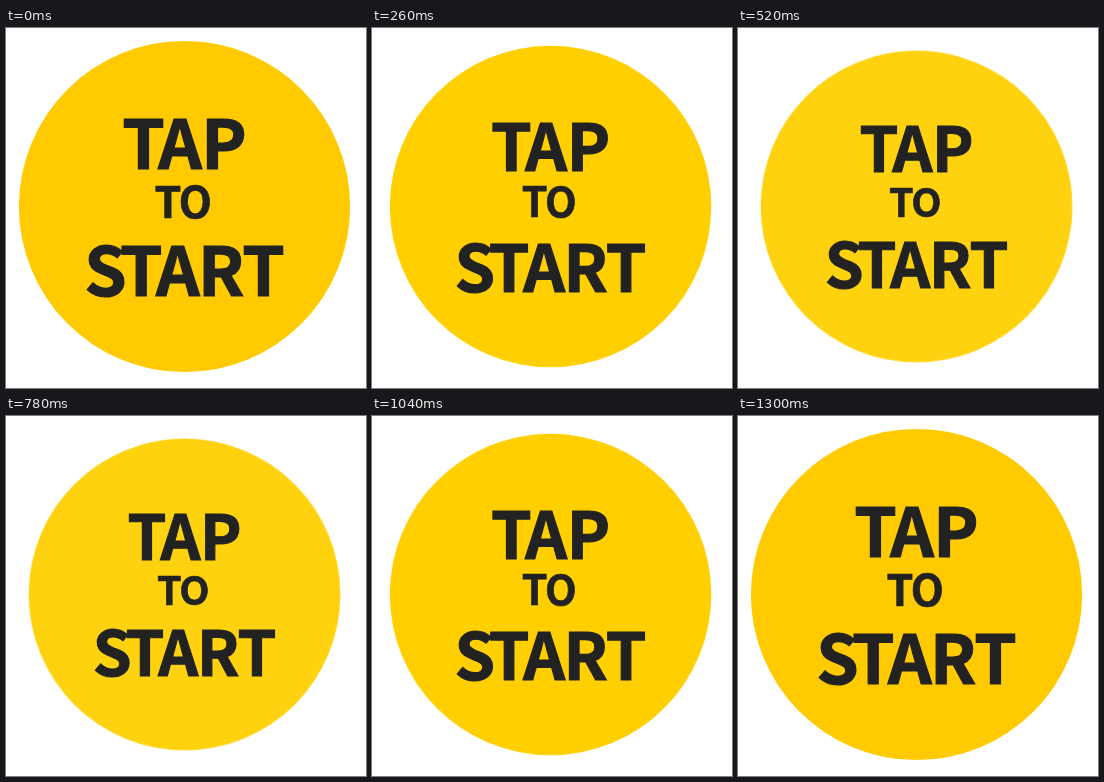
An HTML page for the animation above (1430 ms loop, 360 by 360 pixels).

```html
<!DOCTYPE html>
<html lang="en">
<head>
<meta charset="utf-8">
<title>Tap to start</title>
<style>
  html, body {
    margin: 0;
    width: 100%;
    height: 100%;
    overflow: hidden;
    background: #fff;
  }
  svg { display: block; width: 100vw; height: 100vh; }

  .disc, .label { animation: 1430ms infinite; }
  .disc {
    --small: 0.9265;
    transform-origin: 178.5px 178.5px;
    fill: #ffcb00;
    animation-name: shrink, tint;
  }
  .label {
    --small: 0.895;
    transform-origin: 179px 179.5px;
    fill: #222;
    stroke: #222;
    stroke-width: 1.2;
    font: 700 68px "Noto Sans CJK JP", "Noto Sans CJK SC", "Open Sans", sans-serif;
    text-anchor: middle;
    animation-name: shrink;
  }
  .minor { font-size: 43px; stroke-width: 0.7; }

  /* Five steps in, five steps out, then one slot of rest */
  @keyframes shrink {
    0% { transform: scale(1); animation-timing-function: steps(5); }
    45.4545% { transform: scale(var(--small)); animation-timing-function: steps(5); }
    90.909%, 100% { transform: scale(1); }
  }
  @keyframes tint {
    0% { fill: #ffcb00; animation-timing-function: steps(2); }
    18.1818% { fill: #ffcf00; animation-timing-function: steps(3); }
    45.4545% { fill: #ffd316; animation-timing-function: steps(3); }
    72.7272% { fill: #ffcf00; animation-timing-function: steps(2); }
    90.909%, 100% { fill: #ffcb00; }
  }
</style>
</head>
<body>
<svg viewBox="0 0 360 360">
  <circle class="disc" cx="178.5" cy="178.5" r="165.6"/>
  <g class="label">
    <text x="137.5 174 218" y="141">TAP</text>
    <text class="minor" x="162 189.3" y="189.7">TO</text>
    <text x="99.5 135.3 171.7 215.3 257.5" y="267.8">START</text>
  </g>
</svg>
</body>
</html>
```
